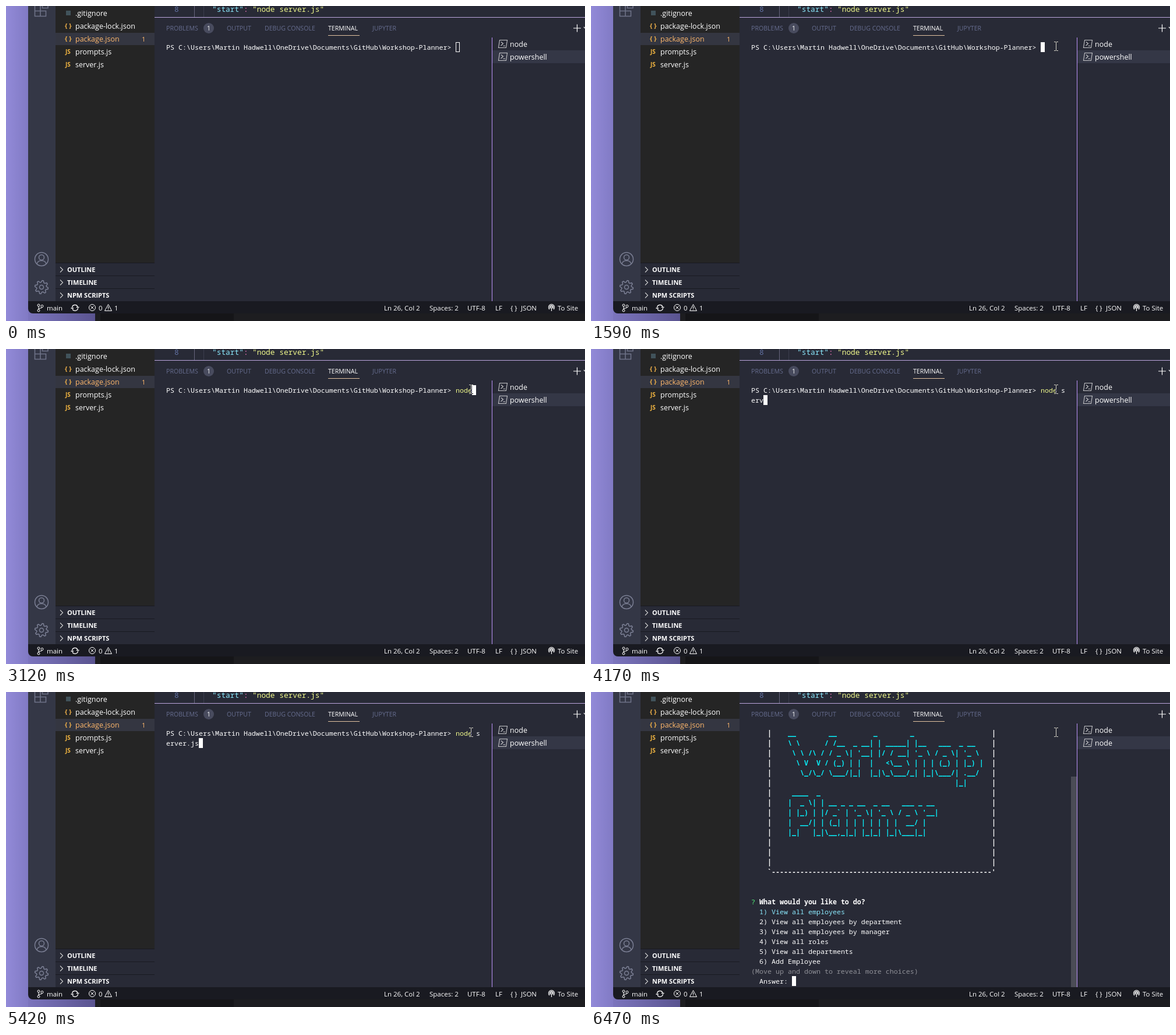
An HTML page with a canvas for the animation above (8 s loop, 994x540 px).

```html
<!DOCTYPE html>
<html lang="en">
<head>
<meta charset="utf-8">
<title>Terminal session</title>
<style>
html, body { margin: 0; width: 100%; height: 100%; overflow: hidden; background: #282a36; }
canvas { display: block; }
</style>
</head>
<body>
<canvas id="stage" width="994" height="540"></canvas>
<script>
const LOOP = 8000, COL = 7, ROW = 17, LEFT = 275, TOP = 62, COLUMNS = 77;
const BG = '#282a36', RAISED = '#343746', DARK = '#191a21', WHITE = '#fff';
const PURPLE = '#bd93f9', ORANGE = '#ffb86c', CYAN = '#8be9fd', YELLOW = '#f1fa8c', MUTED = '#666d8f';
const UI = '"Open Sans", "Noto Sans", sans-serif';
const MONO = '"Noto Sans Mono", "DejaVu Sans Mono", monospace';

const PROMPT = String.raw`PS C:\Users\Martin Hadwell\OneDrive\Documents\GitHub\Workshop-Planner> `;
const COMMAND = 'node server.js';
// [time, typed characters, caret hidden while the line is redrawn]
const TYPING = [
  [0, 0], [2580, 0, true], [2640, 1], [2770, 2], [2840, 3], [3120, 4], [3250, 5], [3710, 6],
  [3900, 6, true], [3970, 7], [4100, 8], [4170, 9], [4300, 10], [4360, 11],
  [4960, 11, true], [5020, 12], [5290, 12, true], [5350, 13], [5420, 14]
];
// ~ stands for a backtick
const BANNER = String.raw`
__        __         _        _
\ \      / /__  _ __| | _____| |__   ___  _ __
 \ \ /\ / / _ \| '__| |/ / __| '_ \ / _ \| '_ \
  \ V  V / (_) | |  |   <\__ \ | | | (_) | |_) |
   \_/\_/ \___/|_|  |_|\_\___/_| |_|\___/| .__/
                                         |_|
 ____  _
|  _ \| | __ _ _ __  _ __   ___ _ __
| |_) | |/ _~ | '_ \| '_ \ / _ \ '__|
|  __/| | (_| | | | | | | |  __/ |
|_|   |_|\__,_|_| |_|_| |_|\___|_|`.replaceAll('~', '`').split('\n').slice(1);
const MENU = ['View all employees', 'View all employees by department', 'View all employees by manager',
  'View all roles', 'View all departments', 'Add Employee'];

const ctx = document.getElementById('stage').getContext('2d', { alpha: false });

function rect(x, y, w, h, color) {
  ctx.fillStyle = color;
  ctx.fillRect(x, y, w, h);
}
function text(str, x, y, color, size = 12.5, family = UI, weight = 500) {
  ctx.font = `${weight} ${size}px ${family}`;
  ctx.fillStyle = color;
  ctx.fillText(str, x, y);
}
function stroke(path, color, width = 1, x = 0, y = 0) {
  ctx.save();
  ctx.translate(x, y);
  ctx.strokeStyle = color;
  ctx.lineWidth = width;
  ctx.stroke(new Path2D(path));
  ctx.restore();
}
function circle(x, y, r, color) {
  ctx.fillStyle = color;
  ctx.beginPath();
  ctx.arc(x, y, r, 0, Math.PI * 2);
  ctx.fill();
}
const ring = (x, y, r) => `M${x - r} ${y}a${r} ${r} 0 1 0 ${2 * r} 0a${r} ${r} 0 1 0 ${-2 * r} 0`;
const term = (str, col, row, color = WHITE, weight = 500) =>
  text(str, LEFT + col * COL, TOP + 13 + row * ROW, color, COL / 0.6, MONO, weight);
const caret = (col, row) => rect(LEFT + col * COL, TOP + row * ROW, COL, ROW, WHITE);

function drawDesktop() {
  const side = ctx.createLinearGradient(0, 0, 38, 0);
  side.addColorStop(0, '#928ad8');
  side.addColorStop(1, '#817ac4');
  rect(0, 0, 60, 540, side);
  const below = ctx.createLinearGradient(20, 0, 153, 0);
  below.addColorStop(0, '#817ac4');
  below.addColorStop(1, '#5a5490');
  rect(38, 520, 115, 20, below);
  rect(153, 520, 841, 20, '#1d1d20');
  rect(162, 527, 229, 13, '#151518');
}

function gearPath() {
  let path = '';
  for (let i = 0; i < 32; i++) {
    const r = i % 4 < 2 ? 11.5 : 8.5, a = (i + 0.5) * Math.PI / 16;
    path += `${i ? 'L' : 'M'}${Math.cos(a) * r} ${Math.sin(a) * r}`;
  }
  return path + 'Z' + ring(0, 0, 3.5);
}

function drawActivityBar() {
  rect(38, 0, 47, 506, RAISED);
  stroke('M49.5 -2V17.5H68.5V8.5H49.5M59 -2V17.5M62.5 -4V3.5H72V-4', '#6e7288', 1.6);
  stroke(ring(61, 434, 11.5) + ring(61, 431, 4.5) + 'M53 442.5Q54 436.5 61 436.5T69 442.5', '#7b7f94', 1.5);
  stroke(gearPath(), '#7b7f94', 1.5, 61, 482);
}

function drawSidebar() {
  rect(85, 0, 170, 506, '#252525');
  rect(85, 46, 170, 21, '#343641');
  const files = ['.gitignore', 'package-lock.json', 'package.json', 'prompts.js', 'server.js'];
  files.forEach((name, i) => {
    const y = 16.5 + i * 22;
    if (!i) rect(103, 8, 8, 8, '#41535b');
    else if (i < 3) text('{ }', 101, y - 0.5, '#e8ab48', 11, UI, 700);
    else text('JS', 102, y - 0.5, '#f0b440', 10, UI, 700);
    text(name, 119, y, i === 2 ? ORANGE : WHITE);
  });
  text('1', 233, 60.5, ORANGE, 11.5);
  ['OUTLINE', 'TIMELINE', 'NPM SCRIPTS'].forEach((name, i) => {
    const y = 440 + i * 22;
    rect(85, y, 170, 22, BG);
    rect(85, y, 170, 1, DARK);
    stroke(`M93 ${y + 7.5}l4.5 4.5l-4.5 4.5`, '#d0d0d0', 1.1);
    text(name, 105, y + 16, WHITE, 11, UI, 700);
  });
}

function drawEditor() {
  rect(255, 0, 739, 506, BG);
  rect(323, 0, 1, 19, '#66647c');
  rect(339, 0, 1, 19, '#3c3e4d');
  const code = (str, x, color) => text(str, x, 10, color, 12.83, MONO);
  code('8', 289, '#6272a4');
  code('"start"', 354, CYAN);
  code(':', 408, '#ff79c6');
  code('"node server.js"', 423, YELLOW);
  rect(255, 19, 739, 1, '#bba6dd');
}

function drawPanelTabs() {
  const tabs = { PROBLEMS: 275, OUTPUT: 379, 'DEBUG CONSOLE': 444, TERMINAL: 553, JUPYTER: 629 };
  for (const [name, x] of Object.entries(tabs))
    text(name, x, 42, name === 'TERMINAL' ? WHITE : MUTED, 10.6);
  rect(553, 50, 54, 1, '#e2c3a0');
  circle(348, 38, 9, '#484b5e');
  text('1', 345, 42, WHITE, 10.6);
  stroke('M974 38H987M980.5 31.5V44.5M992 36l3 3', WHITE, 1.2);
}

function drawTerminalList(second) {
  rect(834, 54, 1, 452, PURPLE);
  rect(835, 76, 159, 22, RAISED);
  ['node', second].forEach((name, i) => {
    const y = 65 + i * 22;
    stroke('M2.5 -6.5H15.5L13.5 6.5H.5ZM5 -3.5l3.5 3l-4 3.5M8.5 3.5h3.5', '#c5c5c8', 1.1, 845, y);
    text(name, 865, y + 4.5, WHITE);
  });
}

function drawStatusBar() {
  ctx.fillStyle = DARK;
  ctx.beginPath();
  ctx.roundRect(38, 506, 964, 21, [0, 0, 8, 8]);
  ctx.fill();
  stroke(ring(56, 513, 2) + ring(56, 522, 2) + ring(62, 514.5, 2) + 'M56 515v5q0 -2 3 -2t3 -1.5', WHITE);
  stroke('M113.5 516.5a5 5 0 0 1 9.5 -1M123.5 518a5 5 0 0 1 -9.5 1.5M121 516.5h4.5M111.5 518h4.5', WHITE, 1.3);
  stroke(ring(148, 517, 5.5) + 'M145.5 514.5l5 5m0 -5l-5 5', WHITE);
  stroke('M175.5 511.5L181.5 522.5H169.5ZM175.5 515v4m0 1v1', WHITE);
  stroke(ring(936.5, 516, 1.5) + 'M933 520a5 5 0 1 1 7 0M934.5 518.5a3 3 0 1 1 4 0M936.5 517.5V523', WHITE, 1.2);
  const items = { main: 70, 0: 159, 1: 186, 'Ln 26, Col 2': 649, 'Spaces: 2': 727, 'UTF-8': 792,
    LF: 840, '{ }': 866, JSON: 884, 'To Site': 947 };
  for (const [label, x] of Object.entries(items)) text(label, x, 521.5, WHITE, 11.5);
}

function drawCommandLine(t) {
  const [, count, hidden] = TYPING.findLast(step => step[0] <= t);
  const room = COLUMNS - PROMPT.length;
  const typed = COMMAND.slice(0, count);
  term(PROMPT, 0, 0);
  term(typed.slice(0, 4), PROMPT.length, 0, YELLOW);
  term(typed.slice(4, room), PROMPT.length + 4, 0);
  term(typed.slice(room), 0, 1);
  if (t < 1450) {
    ctx.strokeStyle = WHITE;
    ctx.lineWidth = 1;
    ctx.strokeRect(LEFT + PROMPT.length * COL + 0.5, TOP + 0.5, COL - 1, ROW - 1);
  } else if (t >= 6150) {
    caret(0, 2);
  } else if (!hidden) {
    if (count > room) caret(count - room, 1);
    else caret(Math.min(PROMPT.length + count, COLUMNS - 1), 0);
    // a full line leaves the caret on top of its last character
    if (count === room) term(typed.at(-1), COLUMNS - 1, 0, BG);
  }
}

function drawMenu() {
  for (let row = 0; row < 14; row++) {
    term('|', 4, row, WHITE, 700);
    term('|', 59, row, WHITE, 700);
  }
  term('`' + '-'.repeat(54) + "'", 4, 14, WHITE, 700);
  BANNER.forEach((line, row) => term(line, 9, row, '#08f4ff', 700));
  term('?', 0, 17, '#50fa7b');
  term('What would you like to do?', 2, 17, WHITE, 700);
  MENU.forEach((label, i) => term(`${i + 1}) ${label}`, 2, 18 + i, i ? WHITE : CYAN));
  term('(Move up and down to reveal more choices)', 0, 24, '#8f9097');
  term('Answer:', 2, 25);
  caret(10, 25);
  rect(824, 145, 10, 361, '#4b4c56');
}

function drawPointer(t) {
  if (t < 260) return;
  const step = Math.min(8, Math.floor((t - 260) / 66.25));
  const p = 1 - (1 - step / 8) ** 1.5, q = 1 - p;
  const along = (a, b, c) => Math.round(q * q * a + 2 * p * q * b + p * p * c);
  const x = along(866, 585, 798), y = along(402, 220, 69);
  if (t >= 1450 && t < 1590) circle(796, 68, 12, 'rgba(255,255,0,.47)');
  ctx.save();
  if (x > 834) {
    ctx.translate(x, y);
    const arrow = new Path2D('M.5 .5V16.5L4.2 13L6.6 18.5L9 17.5L6.6 12H11.5Z');
    ctx.fillStyle = '#fff';
    ctx.fill(arrow);
    ctx.strokeStyle = '#000';
    ctx.lineWidth = 1;
    ctx.stroke(arrow);
  } else {
    ctx.globalCompositeOperation = 'difference';
    stroke('M-3 -7.5H0M1 -7.5H4M.5 -7V7M-3 7.5H0M1 7.5H4', '#fff', 1, x, y);
  }
  ctx.restore();
}

function draw(t) {
  drawDesktop();
  drawActivityBar();
  drawSidebar();
  drawEditor();
  drawPanelTabs();
  drawTerminalList(t < 6280 ? 'powershell' : 'node');
  drawStatusBar();
  if (t < 6470) drawCommandLine(t);
  else drawMenu();
  drawPointer(t);
}

const start = performance.now();
function tick() {
  draw((performance.now() - start) % LOOP);
  requestAnimationFrame(tick);
}
tick();
</script>
</body>
</html>
```
